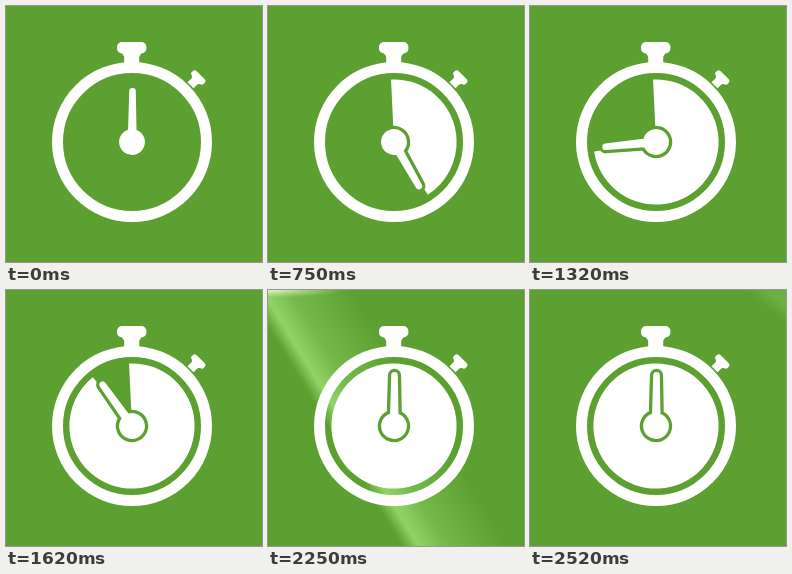
An HTML page with a canvas for the animation above (2.7 s loop, 256 by 256 pixels).

```html
<!DOCTYPE html>
<html lang="en">
<head>
<meta charset="utf-8">
<title>Stopwatch</title>
<style>
html, body { margin: 0; width: 100%; height: 100%; overflow: hidden; background: #5ba030; }
canvas { display: block; width: 100vw; height: 100vh; }
</style>
</head>
<body>
<canvas id="stage" width="256" height="256"></canvas>
<script>
const ctx = document.getElementById('stage').getContext('2d');
const GREEN = '#5ba030', WHITE = '#fff';
const LOOP = 2700, STEP = 30, TURN = 1800, SHINE = 2100, HOLD = 2520;
const CX = 126, CY = 136, RAD = Math.PI / 180;

const crown = new Path2D();
crown.roundRect(-14.7, -7, 29.4, 11.5, 5);
crown.moveTo(-12, 2);
crown.lineTo(12, 2);
crown.quadraticCurveTo(8, 6, 7.5, 8);
crown.lineTo(7.5, 18);
crown.lineTo(-7.5, 18);
crown.lineTo(-7.5, 8);
crown.quadraticCurveTo(-8, 6, -12, 2);

// Tapered needle with a round hub, drawn as one outline
const hand = new Path2D();
hand.moveTo(-3.9, -12.2);
hand.lineTo(-2.8, -50.6);
hand.arc(0.5, -50.6, 3.3, Math.PI, 0);
hand.lineTo(4.5, -12.2);
hand.arc(0, 0, 12.9, -70 * RAD, 252 * RAD);
hand.closePath();

function place(x, y, deg, scale, draw) {
  ctx.save();
  ctx.translate(x, y);
  ctx.rotate(deg * RAD);
  ctx.scale(scale, scale);
  draw();
  ctx.restore();
}

// Streak of light crossing from the lower left to the upper right
function drawShine(ms) {
  const p = ms / (HOLD - SHINE);
  const a = 8 + 0.57 * ms;
  const tilt = 69 - 0.07 * ms;
  const tail = 16 + 0.4 * ms;
  const power = 0.22 + 0.5 * Math.sin(Math.PI * p);
  place(a, 256 - a, tilt - 90, 1, () => {
    const g = ctx.createLinearGradient(-14, 0, tail, 0);
    const peak = 14 / (14 + tail);
    g.addColorStop(0, 'rgba(172,236,130,0)');
    g.addColorStop(peak, `rgba(172,236,130,${power})`);
    g.addColorStop(peak + (1 - peak) * 0.3, `rgba(172,236,130,${power * 0.5})`);
    g.addColorStop(1, 'rgba(172,236,130,0)');
    ctx.fillStyle = g;
    ctx.fillRect(-14, -400, 14 + tail, 800);
  });

  const topX = a - (256 - a) / Math.tan(tilt * RAD);
  const glow = Math.sin(Math.PI * p) ** 2;
  ctx.save();
  ctx.translate(topX, 0);
  ctx.scale(85, 8);
  const g = ctx.createRadialGradient(0, 0, 0, 0, 0, 1);
  g.addColorStop(0, `rgba(255,255,235,${glow})`);
  g.addColorStop(0.4, `rgba(240,255,215,${glow * 0.6})`);
  g.addColorStop(1, 'rgba(200,245,160,0)');
  ctx.fillStyle = g;
  ctx.fillRect(-1, 0, 2, 1);
  ctx.restore();
}

function drawCase() {
  ctx.fillStyle = ctx.strokeStyle = WHITE;
  ctx.lineWidth = 11;
  ctx.beginPath();
  ctx.arc(CX, CY, 74.5, 0, 2 * Math.PI);
  ctx.stroke();
  place(125.7, 43, 0, 1, () => ctx.fill(crown));
  place(191.8, 72, 45, 0.57, () => ctx.fill(crown));
}

function drawDial(deg) {
  if (deg > 0) {
    const start = -92.7 * RAD;
    ctx.fillStyle = WHITE;
    ctx.beginPath();
    if (deg < 360) ctx.moveTo(CX, CY);
    ctx.arc(CX, CY, 62.6, start, start + deg * RAD);
    ctx.fill();
  }
  place(CX, CY, deg, 1, () => {
    ctx.strokeStyle = GREEN;
    ctx.lineWidth = 6.6;
    ctx.lineJoin = 'round';
    ctx.stroke(hand);
    ctx.fillStyle = WHITE;
    ctx.fill(hand);
  });
}

function render(now) {
  const t = Math.min(HOLD, Math.floor((now % LOOP) / STEP) * STEP);
  ctx.fillStyle = GREEN;
  ctx.fillRect(0, 0, 256, 256);
  if (t >= SHINE) drawShine(t - SHINE);
  drawCase();
  drawDial(Math.min(t, TURN) / TURN * 360);
}

const origin = performance.now();
function tick() {
  render(performance.now() - origin);
  requestAnimationFrame(tick);
}
tick();
</script>
</body>
</html>
```
